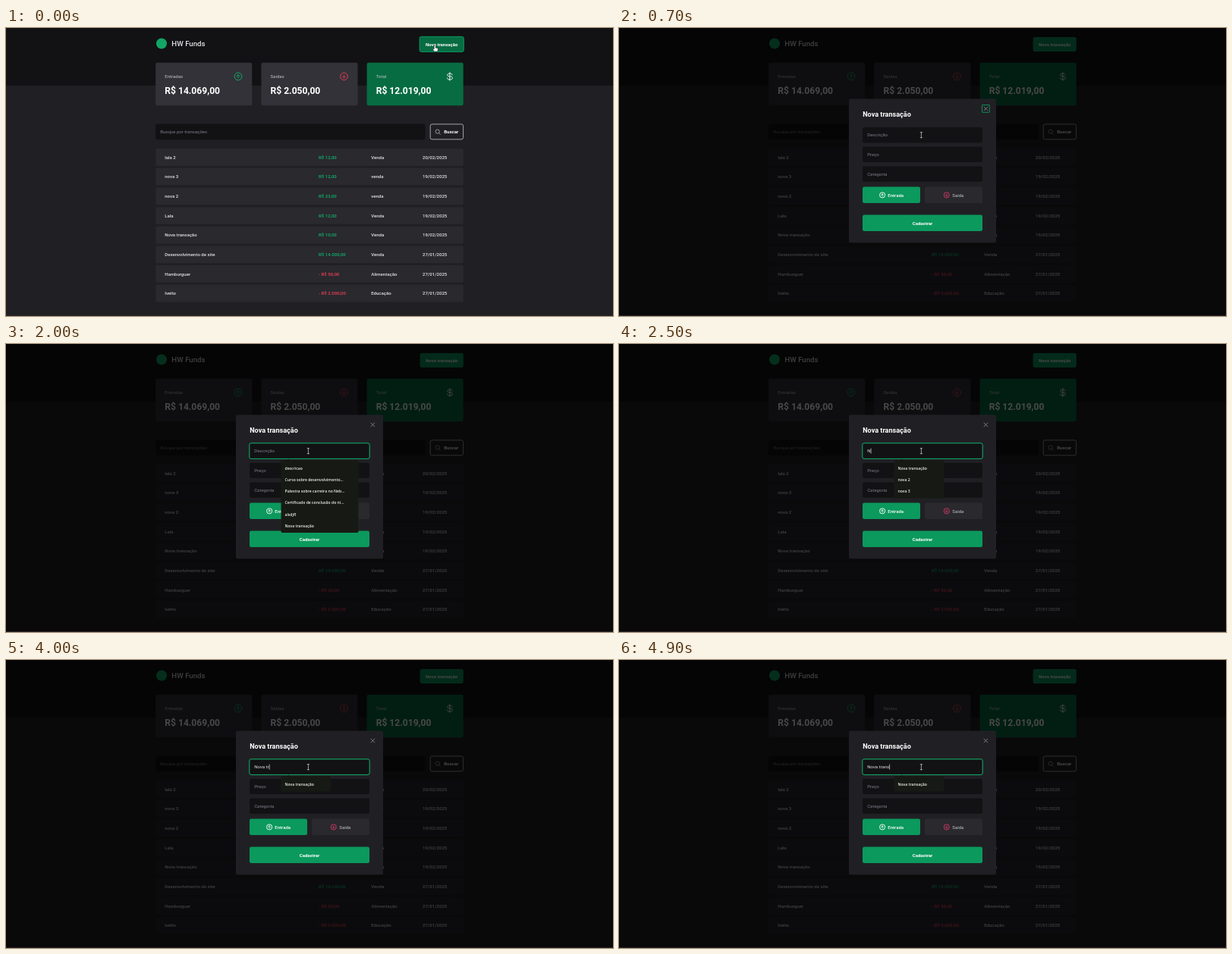
An HTML page that plays this animation: 800x380 px, repeating every 5000 ms.

```html
<!DOCTYPE html>
<html lang="pt-BR">
<head>
<meta charset="utf-8">
<title>Nova transação</title>
<style>
  html, body { margin: 0; width: 100%; height: 100%; overflow: hidden; background: #202024; }
  svg { display: block; width: 100vw; height: 100vh; }
  text { font-family: Roboto, Arial, sans-serif; font-size: 6.06px; white-space: pre; }
  .list text { font-family: "Open Sans", "Noto Sans", sans-serif; font-size: 5.1px; font-weight: 600; }
</style>
</head>
<body>
<svg id="stage" viewBox="0 0 800 380">
  <g id="page"></g>
  <g id="modal"></g>
  <rect y="379" width="800" height="1" fill="#2a2226"/>
  <g id="pointer"></g>
</svg>
<script>
const LOOP = 5000, STEP = 100;
const OPEN_AT = 100, FOCUS_AT = 900, LIST_AT = 1000;
const KEYS = [2500, 2700, 2900, 3000, 3300, 3500, 3800, 4300, 4500, 4700];
const TYPED = "Nova trans";
const HISTORY = [
  "descricao", "Curso sobre desenvolvimento...", "Palestra sobre carreira no Neb...",
  "Certificado de conclusão do ni...", "alsdjfl", "Nova transação"
];
const MATCHES = ["Nova transação", "nova 2", "nova 3"];

const C = {
  ink: "#121214", body: "#202024", row: "#29292e", card: "#323238",
  mute: "#7c7c8a", soft: "#c4c4cc", text: "#e1e1e6", white: "#fff",
  deep: "#086c43", green: "#0b995d", bright: "#12b26e", red: "#ee3f57", pink: "#d63a63"
};

const $ = id => document.getElementById(id);

function add(parent, tag, attrs = {}) {
  const el = document.createElementNS("http://www.w3.org/2000/svg", tag);
  for (const k in attrs) el.setAttribute(k, attrs[k]);
  return parent.appendChild(el);
}
const box = (g, x, y, width, height, fill, more = {}) =>
  add(g, "rect", { x, y, width, height, rx: 2.3, fill, ...more });
function label(g, x, y, str, fill, more = {}) {
  const el = add(g, "text", { x, y, fill, ...more });
  el.textContent = str;
  return el;
}
const line = (g, d, stroke, width = 0.8) =>
  add(g, "path", { d, stroke, fill: "none", "stroke-width": width, "stroke-linecap": "round", "stroke-linejoin": "round" });
const show = (el, on) => el.setAttribute("display", on ? "inline" : "none");
const bold = { "font-weight": 700 };
const centred = { ...bold, "text-anchor": "middle" };

// Circle with an arrow; dir is -1 for up, 1 for down
function arrowIcon(g, x, y, r, dir, color) {
  const a = r * 0.46, tip = y + a * dir;
  add(g, "circle", { cx: x, cy: y, r, fill: "none", stroke: color, "stroke-width": 0.9 });
  line(g, `M${x} ${y - a * dir}V${tip}M${x - a} ${tip - a * dir}L${x} ${tip}L${x + a} ${tip - a * dir}`, color);
}

// Page
const page = $("page");
add(page, "rect", { width: 800, height: 380, fill: C.body });
add(page, "rect", { width: 800, height: 76, fill: C.ink });
add(page, "circle", { cx: 205, cy: 20.5, r: 7, fill: "#12a566" });
label(page, 218.3, 24.3, "HW Funds", C.text, { "font-size": 9.7, style: "font-size:9.7px", "font-weight": 500 });
const newButton = box(page, 545.6, 11.9, 57.2, 19, C.green);
const hoverButton = box(page, 545.1, 11.4, 58.2, 20, C.deep, { stroke: C.green, "stroke-width": 1 });
label(page, 574.2, 23.5, "Nova transação", C.white, centred);

[["Entradas", "R$ 14.069,00"], ["Saídas", "R$ 2.050,00"], ["Total", "R$ 12.019,00"]].forEach(([name, sum], i) => {
  const x = 197.2 + 139.2 * i;
  box(page, x, 45.8, 127.1, 56.5, i === 2 ? C.deep : C.card);
  label(page, x + 12.1, 66, name, C.soft);
  label(page, x + 12.1, 87.3, sum, C.white, { ...bold, style: "font-size:12.1px" });
});
arrowIcon(page, 306, 63.9, 4.9, -1, C.bright);
arrowIcon(page, 445.5, 63.9, 4.9, 1, C.red);
line(page, "M584.9 58.8V69.2M588 61.9C587.8 60.7 586.9 60.1 585.8 60.1H584.2C582.7 60.1 581.8 60.9 581.8 62C581.8 63.2 582.7 63.9 584.2 63.9H585.8C587.4 63.9 588.4 64.8 588.4 66C588.4 67.2 587.4 68 585.8 68H584C582.5 68 581.6 67.2 581.5 66", C.white, 0.9);

box(page, 197.2, 126.5, 355.4, 20.8, C.ink);
label(page, 203.2, 139.1, "Busque por transações", C.mute);
box(page, 559.2, 126.9, 43.4, 20, "none", { stroke: C.soft, "stroke-width": 0.8 });
add(page, "circle", { cx: 568.7, cy: 136.6, r: 2.6, fill: "none", stroke: C.soft, "stroke-width": 0.7 });
line(page, "M570.6 138.5L572.4 140.3", C.soft, 0.7);
label(page, 577.2, 139.1, "Buscar", C.white, bold);

[
  ["lala 2", "R$ 12,00", "Venda", "20/02/2025"],
  ["nova 3", "R$ 12,00", "venda", "19/02/2025"],
  ["nova 2", "R$ 23,00", "venda", "19/02/2025"],
  ["Lala", "R$ 12,00", "Venda", "19/02/2025"],
  ["Nova transação", "R$ 10,00", "Venda", "19/02/2025"],
  ["Desenvolvimento de site", "R$ 14.000,00", "Venda", "27/01/2025"],
  ["Hamburguer", "- R$ 50,00", "Alimentação", "27/01/2025"],
  ["Ivelto", "- R$ 2.000,00", "Educação", "27/01/2025"]
].forEach((cells, i) => {
  const y = 159.2 + 25.65 * i;
  box(page, 197.2, y, 405.6, 22.7, C.row);
  cells.forEach((str, j) => {
    const color = j !== 1 ? C.text : str[0] === "-" ? C.red : C.bright;
    label(page, [209.2, 412, 481.2, 549][j], y + 13.4, str, color, { "font-weight": 500 });
  });
});

// Modal
const modal = $("modal");
add(modal, "rect", { width: 800, height: 379, fill: "#000", opacity: 0.72 });
box(modal, 303, 93.5, 194, 189.8, C.body);
label(modal, 321.2, 117.3, "Nova transação", C.white, { ...bold, style: "font-size:9.09px" });
line(modal, "M481 104.1L485.8 108.9M485.8 104.1L481 108.9", "#a0a0aa", 0.7);
const closeRing = box(modal, 478.5, 101.5, 9.8, 9.8, "none", { rx: 0.4, stroke: C.green, "stroke-width": 0.9 });
["Descrição", "Preço", "Categoria"].forEach((name, i) =>
  box(modal, 321, 131 + 25.7 * i, 158, 20.4, C.ink));
const [hint] = ["Descrição", "Preço", "Categoria"].map((name, i) =>
  label(modal, 327.2, 143.3 + 25.7 * i, name, C.mute));
const focusRing = box(modal, 320.8, 130.8, 158.4, 20.6, "none", { stroke: C.bright, "stroke-width": 1 });
const value = label(modal, 327.2, 143.3, "", C.text);
const caret = add(modal, "rect", { y: 137.6, width: 0.6, height: 7, fill: C.white });

box(modal, 321, 209.5, 76, 21.6, C.green);
arrowIcon(modal, 347.1, 220.4, 3.6, -1, C.white);
label(modal, 354.3, 222.6, "Entrada", C.white, { "font-weight": 500 });
box(modal, 403, 209.5, 76, 21.6, C.row);
arrowIcon(modal, 431.8, 220.4, 3.6, 1, C.pink);
label(modal, 439.3, 222.6, "Saída", C.soft);
box(modal, 321, 246.5, 158, 21.6, C.green);
label(modal, 400, 259.5, "Cadastrar", C.white, centred);

// Suggestions under the field
function makeList(items, width) {
  const g = add(modal, "g", { class: "list" });
  add(g, "path", { d: "M370 153.8L372.5 151.6L375 153.8Z", fill: "#171a14" });
  box(g, 362.5, 153.5, width, 5 + 15.1 * items.length, "#171a14", { rx: 1.8 });
  items.forEach((str, i) => label(g, 367.5, 165.9 + 15.15 * i, str, "#eeeee8"));
  return g;
}
const lists = [makeList(HISTORY, 102), makeList(MATCHES, 65.5), makeList(MATCHES.slice(0, 1), 65.5)];

// Pointers, each drawn around its hot spot
const pointer = $("pointer");
const hand = add(pointer, "path", {
  d: "M-1.1 .6Q0 -.6 .9 .6V3.6L3.4 4.2Q4.2 4.5 4.1 5.4L3.5 8.4H-.8L-3 5.6Q-2.6 4.4 -1.1 5.5Z",
  fill: "#fff", stroke: "#111", "stroke-width": 0.5
});
const arrow = add(pointer, "path", {
  d: "M0 0V7.2L1.7 5.6L2.8 8.2L4 7.7L2.9 5.2H5.2Z", fill: "#fff", stroke: "#111", "stroke-width": 0.4
});
const beam = line(pointer, "M-1.2 -3.5H1.2M0 -3.5V3.5M-1.2 3.5H1.2", "#d8d8d8", 0.7);

const ease = p => p * p * (3 - 2 * p);

function draw(t) {
  const open = t >= OPEN_AT, focused = t >= FOCUS_AT;
  show(modal, open);
  show(hoverButton, !open);
  show(newButton, open);
  show(closeRing, !focused);
  show(focusRing, focused);

  const count = KEYS.filter(k => t >= k).length;
  value.textContent = TYPED.slice(0, count);
  show(hint, count === 0);
  show(caret, count > 0);
  if (open && count) caret.setAttribute("x", 327.4 + value.getComputedTextLength());
  const stage = t < LIST_AT ? -1 : count === 0 ? 0 : count < 6 ? 1 : 2;
  lists.forEach((g, i) => show(g, i === stage));

  const p = ease(Math.min(1, Math.max(0, (t - 100) / 600)));
  const x = 565.3 - 166.9 * p, y = 22.5 + 118.7 * p;
  const overField = open && x > 321 && x < 479 && y > 131 && y < 151.4;
  pointer.setAttribute("transform", `translate(${x} ${y})`);
  show(hand, !open);
  show(arrow, open && !overField);
  show(beam, overField);
}

function tick() {
  const t = performance.now() % LOOP;
  draw(Math.floor(t / STEP) * STEP);
  requestAnimationFrame(tick);
}
tick();
</script>
</body>
</html>
```
